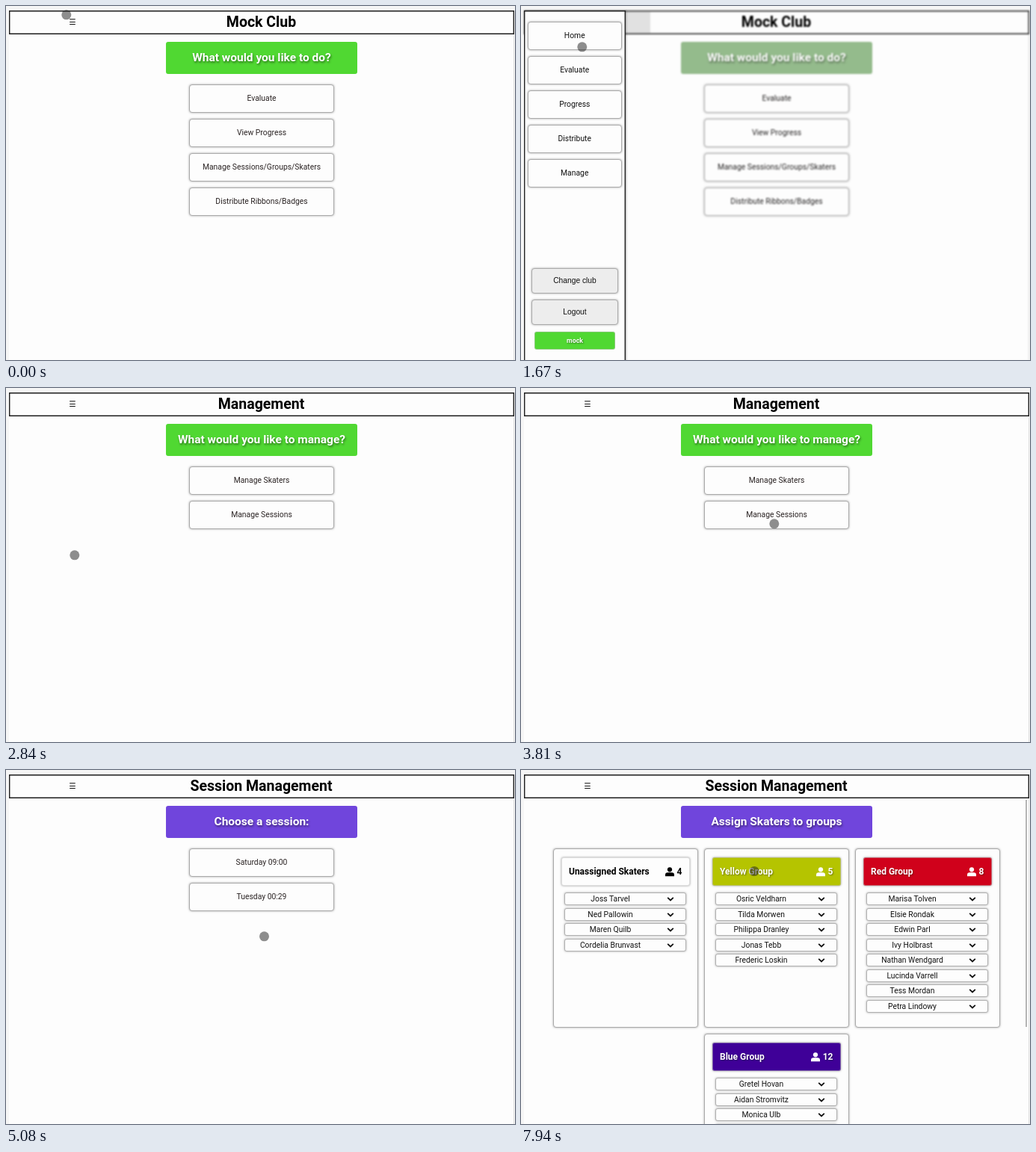
These frames come from a looping animation (681 by 474 pixels, 8000 ms). An HTML page:

```html
<!DOCTYPE html>
<html lang="en">
<head>
<meta charset="utf-8">
<title>Session management walkthrough</title>
<style>
html, body { margin: 0; width: 100%; height: 100%; overflow: hidden; background: #f6f6f6; }
#stage { position: relative; width: 681px; height: 474px; overflow: hidden; font: 10.35px Roboto, sans-serif; color: #2a2323; }
#stage div, #stage svg { position: absolute; box-sizing: border-box; white-space: pre; }
.page, .clip { overflow: hidden; left: 4px; top: 0; width: 676px; height: 474px; }
.sheet { background: #fdfdfd; }
.edge { background: #dedede; }
.header { box-shadow: inset 0 0 0 1.4px #1c1c1c; }
.title { font-weight: 700; font-size: 19.5px; color: #000; text-align: center; }
.burger { font-family: "DejaVu Sans", sans-serif; color: #111; text-align: center; }
.banner { border-radius: 3px; color: #fff; font-weight: 700; font-size: 15.5px; text-align: center; text-shadow: 1px 2px 3px rgba(0,0,0,.45); }
.button, .card, .row { background: #fdfdfd; border: 1px solid #aaa; border-radius: 4px; box-shadow: 0 0 3px rgba(0,0,0,.35); text-align: center; }
.row { border-color: #b0b0b0; border-radius: 3px; }
.name { text-align: center; color: #111; }
.native { background: #ededed; font-family: "Liberation Sans", Arial, sans-serif; font-size: 10.25px; color: #000; }
.group, .chip { border: 1px solid rgba(190,190,190,.5); border-radius: 3px; font-weight: 700; }
.group { box-shadow: 0 0 3px rgba(0,0,0,.4); font-size: 12px; padding-left: 9px; }
.light { color: #fff; text-shadow: 1px 1px 2px rgba(0,0,0,.4); }
.count { text-align: right; }
.side { background: #fdfdfd; box-shadow: inset 0 0 0 1.4px #222, 1px 0 2px rgba(0,0,0,.3); }
.side .button { color: #111; }
.chip { background: #50d832; color: #fff; font-size: 8.8px; text-align: center; text-shadow: 1px 1px 2px rgba(0,0,0,.45); }
.scroll { background: #b5b5b5; }
.cursor { width: 13.4px; height: 13.4px; border-radius: 50%; background: rgba(30,30,30,.5); }
</style>
</head>
<body>
<div id="stage"></div>
<script>
const GREEN = '#50d832', PURPLE = '#7045dc', LOOP = 8000;
const stage = document.getElementById('stage');

function box(parent, cls, x, y, w, h, text = '', style = {}) {
  const el = document.createElement('div');
  el.className = cls;
  Object.assign(el.style, { left: x + 'px', top: y + 'px', width: w + 'px', height: h + 'px' }, style);
  if (text) {
    const border = /button|group|chip/.test(cls) ? 2 : 0;
    el.style.lineHeight = h - border + 'px';
    el.textContent = text;
  }
  parent.append(el);
  return el;
}

function svg(parent, x, y, w, h, body) {
  parent.insertAdjacentHTML('beforeend',
    `<svg style="left:${x}px;top:${y}px" width="${w}" height="${h}" viewBox="0 0 ${w} ${h}">${body}</svg>`);
}

// Page coordinates start 4px right of the stage edge.
function page(title, heading, color, choices = []) {
  const p = box(stage, 'page', 4, 0, 676, 474);
  box(p, 'sheet', 0, 6, 675, 468);
  box(p, 'edge', 675, 38, 1, 436);
  box(p, 'header', 0, 6, 675.5, 32);
  box(p, 'burger', 75, 11, 20, 20, '☰');
  box(p, 'title', 0, 7, 675, 29, title);
  box(p, 'banner', 210, 48, 256, 43, heading, { background: color });
  choices.forEach((c, i) => box(p, 'button', 241, 105 + i * 46, 194, 38, c));
  return p;
}

function group(p, x, y, title, count, color, names) {
  const light = color !== '#fdfdfd';
  box(p, 'card', x, y, 194, 240);
  const head = box(p, 'group' + (light ? ' light' : ''), x + 11, y + 12, 172, 38, title,
    { background: color, color: light ? '#fff' : '#000' });
  box(head, 'count', 100, 0, 60.5, 36, String(count));
  const iconX = count > 9 ? 131 : 138;
  svg(head, iconX, 11.5, 12, 13,
    '<g fill="currentColor"><circle cx="6" cy="3.3" r="3.1"/><path d="M0 12.3V10.4Q0 7.2 3.3 7.2H8.7Q12 7.2 12 10.4V12.3Z"/></g>');
  names.forEach((name, i) => {
    const top = y + 59.3 + i * 20.5;
    box(p, 'row', x + 15, top, 163, 17);
    box(p, 'name', x + 15, top, 123, 17, name);
    svg(p, x + 152, top + 5, 10, 8,
      '<path d="M1.2 1.8L5 5.5L8.8 1.8" fill="none" stroke="#111" stroke-width="1.8"/>');
  });
}

const home = page('Mock Club', 'What would you like to do?', GREEN,
  ['Evaluate', 'View Progress', 'Manage Sessions/Groups/Skaters', 'Distribute Ribbons/Badges']);
const focus = box(home, 'focus', 80, 8, 89, 28, '', { background: '#e1e1e1' });
const manage = page('Management', 'What would you like to manage?', GREEN,
  ['Manage Skaters', 'Manage Sessions']);
const sessions = page('Session Management', 'What would you like to do?', GREEN,
  ['Create Session', 'Modify Session', 'Assign Skaters to groups']);
const loading = page('Session Management', 'Choose a session:', PURPLE);
const choose = page('Session Management', 'Choose a session:', PURPLE,
  ['Saturday 09:00', 'Tuesday 00:29']);
const assign = page('Session Management', 'Assign Skaters to groups', PURPLE);

group(assign, 39, 105, 'Unassigned Skaters', 4, '#fdfdfd',
  ['Joss Tarvel', 'Ned Pallowin', 'Maren Quilb', 'Cordelia Brunvast']);
group(assign, 241, 105, 'Yellow Group', 5, '#b5c400',
  ['Osric Veldharn', 'Tilda Morwen', 'Philippa Dranley', 'Jonas Tebb', 'Frederic Loskin']);
group(assign, 443, 105, 'Red Group', 8, '#d0011b',
  ['Marisa Tolven', 'Elsie Rondak', 'Edwin Parl', 'Ivy Holbrast', 'Nathan Wendgard',
   'Lucinda Varrell', 'Tess Mordan', 'Petra Lindowy']);
group(assign, 241, 353, 'Blue Group', 12, '#3f0098',
  ['Gretel Hovan', 'Aidan Stromvitz', 'Monica Ulb', 'Harriet Penvale']);
box(assign, 'scroll', 671, 40, 2, 304);

const clip = box(stage, 'clip', 4, 0, 676, 474);
const side = box(clip, 'side', 0, 6, 136, 480);
['Home', 'Evaluate', 'Progress', 'Distribute', 'Manage'].forEach((label, i) =>
  box(side, 'button', 5, 15 + i * 46, 125.5, 38, label));
box(side, 'button native', 10, 345, 116, 34, 'Change club');
box(side, 'button native', 10, 387, 116, 34, 'Logout');
box(side, 'chip', 14, 430, 108, 24, 'mock');

const cursor = box(stage, 'cursor', 0, 0, 13.4, 13.4);

// [time, page, menu offset (null = closed), filter strength]
const views = [
  [0, home, null, 0], [1280, home, -10.3, 1], [1370, home, 0, 1],
  [2750, manage, -53.5, .5], [2840, manage, null, 0],
  [4100, sessions, null, 0], [5000, loading, null, 0],
  [5080, choose, null, 0], [7350, assign, null, 0]
];

// Each run: first time, last time, pointer positions spread evenly between them.
const runs = [
  [0, 90, [[81, 12], [86, 24.4]]],
  [290, 290, [[87, 24]]],
  [1570, 2350, [[86, 32], [82, 55], [79, 85], [78, 118], [80, 150], [84, 180], [88, 203], [91, 218], [92, 224]]],
  [3050, 3510, [[118, 213], [185, 186], [258, 167], [310, 164], [330, 174], [334, 181.5]]],
  [3810, 3810, [[339, 182]]],
  [4390, 4690, [[340, 190], [343, 206], [345, 218], [345.7, 223]]],
  [6380, 6660, [[344, 214], [340, 186], [336, 155], [334.5, 137]]],
  [6850, 6950, [[333.3, 131], [334, 129]]],
  [7940, 7940, [[312.3, 135.6]]]
];
const moves = runs.flatMap(([from, to, points]) =>
  points.map((p, i) => [from + (to - from) * i / Math.max(1, points.length - 1), ...p]));

const pages = [home, manage, sessions, loading, choose, assign];
const stepAt = (table, t) => table.findLast(step => step[0] <= t + .01);

function draw(t) {
  const [, shown, offset, strength] = stepAt(views, t);
  const [, x, y] = stepAt(moves, t);
  for (const p of pages) p.style.visibility = p === shown ? 'visible' : 'hidden';
  shown.style.filter = strength ? `grayscale(${.72 * strength}) blur(${.85 * strength}px)` : 'none';
  focus.style.display = offset === null ? 'none' : 'block';
  side.style.display = offset === null ? 'none' : 'block';
  side.style.transform = `translateX(${offset || 0}px)`;
  cursor.style.transform = `translate(${x - 6.7}px, ${y - 6.7}px)`;
}

const start = performance.now();
function tick() {
  draw((performance.now() - start) % LOOP);
  requestAnimationFrame(tick);
}
tick();
</script>
</body>
</html>
```
